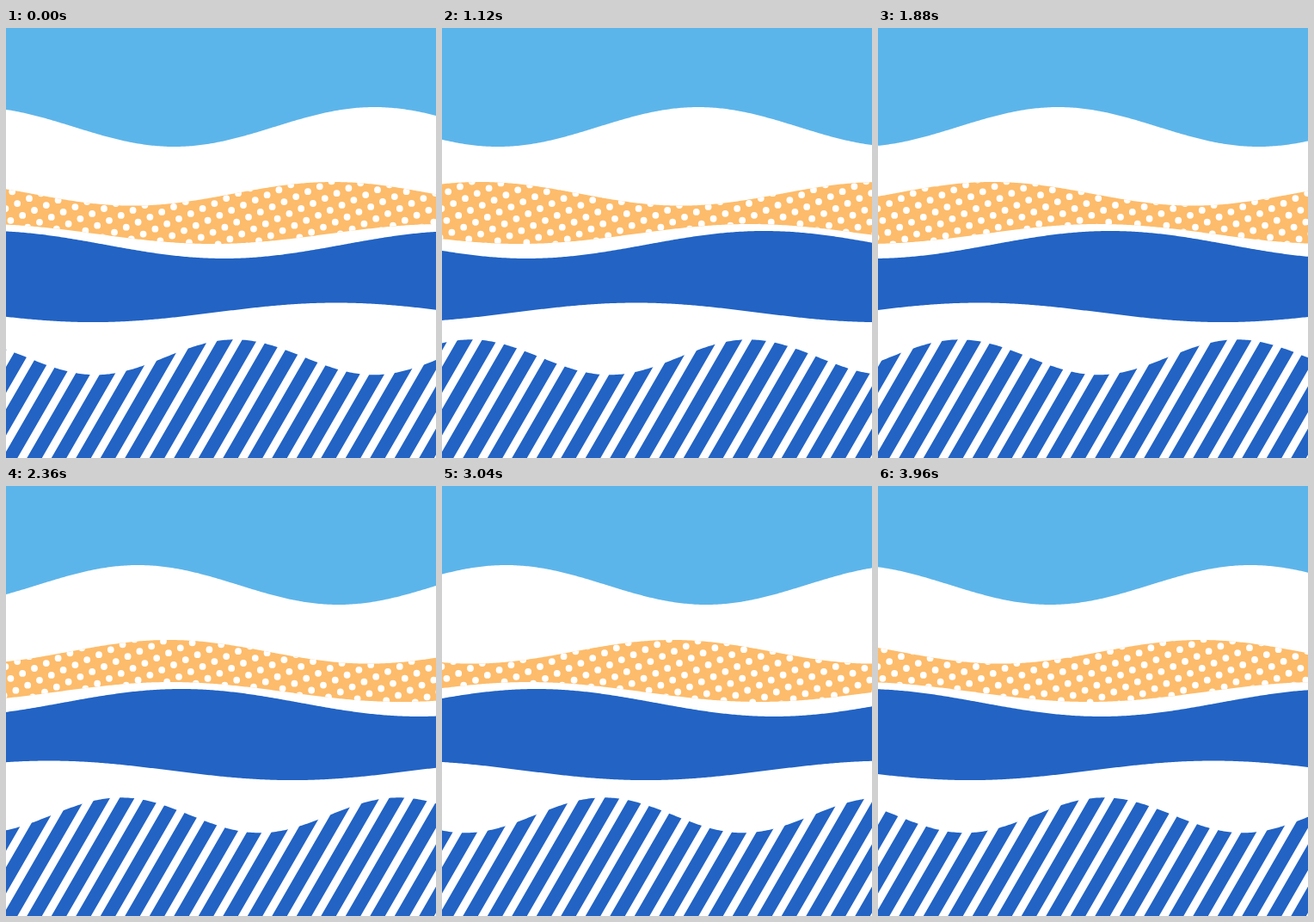
Write an HTML page with a canvas that moves like this. It is 500x500 px and loops after 4 s.

```html
<!DOCTYPE html>
<html lang="en">
<head>
<meta charset="utf-8">
<title>Waves</title>
<style>
html, body { margin: 0; height: 100%; overflow: hidden; background: #fff; }
canvas { display: block; width: 100vw; height: 100vh; }
</style>
</head>
<body>
<canvas id="stage" width="500" height="500"></canvas>
<script>
const SIZE = 500, LOOP = 4000, STEP = 40;
const SKY = '#5cb5ea', SAND = '#fdbc6b', BLUE = '#2263c4';
const ctx = document.getElementById('stage').getContext('2d');

// Cosine edge that travels one wavelength per loop; crest is its highest point at the start.
const wave = (mid, amp, length, crest, dir) => (x, p) =>
  mid - amp * Math.cos(2 * Math.PI * ((x - crest) / length - dir * p));
const flat = y => () => y;

const skyEdge = wave(115, 23, 466, 428.5, -1);
const sandTop = wave(192.8, 13.8, 466, 380, 1);
const sandBottom = wave(239.5, 11.5, 536, 508, -1);
const seaTop = wave(252, 16, 552, 529.5, -1);
const seaBottom = wave(330.8, 11.3, 566, 384, -1);
const stripeTop = wave(382.8, 20.5, 323, 266, 1);

function band(top, bottom, p) {
  ctx.beginPath();
  for (let x = 0; x <= SIZE; x += 2) ctx.lineTo(x, top(x, p));
  for (let x = SIZE; x >= 0; x -= 2) ctx.lineTo(x, bottom(x, p));
  ctx.closePath();
}

function fillBand(top, bottom, color, p) {
  band(top, bottom, p);
  ctx.fillStyle = color;
  ctx.fill();
}

// Tilted square grid of dots, fixed in place.
function dots() {
  ctx.fillStyle = '#fff';
  ctx.beginPath();
  for (let m = -8; m < 36; m++) {
    for (let n = -8; n < 20; n++) {
      const x = 33 + 13.8 * m + 6 * n, y = 212 - 5.92 * m + 13.8 * n;
      if (y < 170 || y > 262) continue;
      ctx.moveTo(x + 3.9, y);
      ctx.arc(x, y, 3.9, 0, 2 * Math.PI);
    }
  }
  ctx.fill();
}

// Slanted stripes, fixed in place.
function stripes() {
  const period = 28.5, width = 17.5, top = 350, slant = (SIZE - top) / Math.sqrt(3);
  ctx.fillStyle = BLUE;
  ctx.beginPath();
  for (let right = 14.4; right < SIZE + slant + 2 * period; right += period) {
    ctx.moveTo(right, top);
    ctx.lineTo(right - slant, SIZE);
    ctx.lineTo(right - slant - width, SIZE);
    ctx.lineTo(right - width, top);
    ctx.closePath();
  }
  ctx.fill();
}

function clipped(top, bottom, p, pattern) {
  ctx.save();
  band(top, bottom, p);
  ctx.clip();
  pattern();
  ctx.restore();
}

function draw(p) {
  ctx.fillStyle = '#fff';
  ctx.fillRect(0, 0, SIZE, SIZE);
  fillBand(flat(0), skyEdge, SKY, p);
  fillBand(sandTop, sandBottom, SAND, p);
  clipped(sandTop, sandBottom, p, dots);
  fillBand(seaTop, seaBottom, BLUE, p);
  clipped(stripeTop, flat(SIZE), p, stripes);
}

const start = performance.now();
function frame() {
  const t = Math.max(0, performance.now() - start) % LOOP;
  draw(Math.floor(t / STEP) * STEP / LOOP);
  requestAnimationFrame(frame);
}
frame();
</script>
</body>
</html>
```
